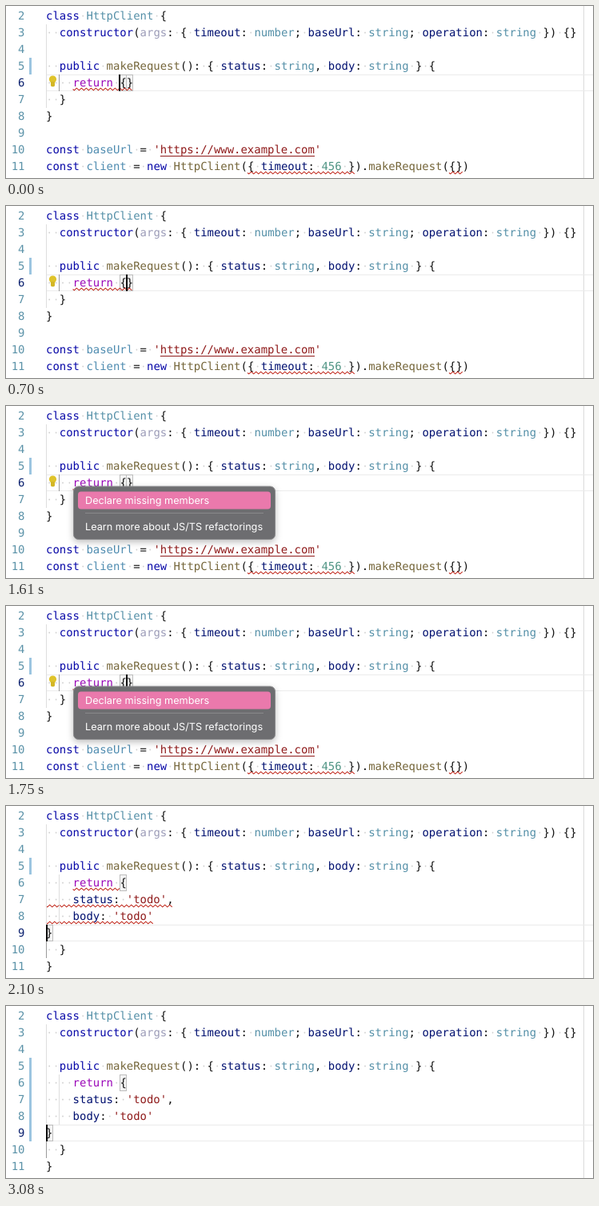
An HTML page that plays this animation: 734x216 px, repeating every 3.15 s.

```html
<!DOCTYPE html>
<html lang="en">
<head>
<meta charset="utf-8">
<title>Declare missing members</title>
<style>
html, body { margin: 0; width: 100%; height: 100%; overflow: hidden; background: #fff; }
svg { display: block; width: 734px; height: 216px; }
.code text {
  font: 13.953px "DejaVu Sans Mono", "Noto Sans Mono", monospace;
  font-variant-ligatures: none;
  text-rendering: geometricPrecision;
}
.plain { fill: #111; }
.key { fill: #0808a8; }
.type { fill: #5590a8; }
.const { fill: #4f8cb0; }
.name { fill: #001070; }
.func { fill: #75663a; }
.flow { fill: #9a08b8; }
.str { fill: #8f1a1a; }
.unused { fill: #9c9cb8; }
.digit { fill: #4f9484; }
.line { fill: #5b92a8; }
.active { fill: #0b216f; }
.dot { fill: #cfcfcf; }
.guide { fill: #dedede; }
.guide.on { fill: #9a9a9a; }
.row { fill: #ebebeb; }
.box { fill: #f4f4f4; stroke: #bdbdbd; }
.wave { fill: none; stroke: #c0281c; stroke-width: 1.05; }
.bar { fill: #9cc5e0; }
.menu text { font: 12.7px Inter, "Liberation Sans", sans-serif; fill: #fff; text-rendering: geometricPrecision; }

#before, #after, #errors, #added, #menu, #caret { animation: 3150ms step-end infinite; }
#before { animation-name: before; }
#after { animation-name: after; }
#errors { animation-name: errors; }
#added { animation-name: added; }
#menu { animation-name: menu; }
#caret { animation-name: caret; }

@keyframes before { 0% { opacity: 1 } 66.6%, 100% { opacity: 0 } }
@keyframes after { 0% { opacity: 0 } 66.6%, 100% { opacity: 1 } }
@keyframes errors { 0% { opacity: 1 } 79.95%, 100% { opacity: 0 } }
@keyframes added { 0% { opacity: 0 } 73.3%, 100% { opacity: 1 } }
@keyframes menu {
  0% { opacity: 0 }
  37.75% { opacity: 1 }
  57.75% { opacity: .7 }
  59.95% { opacity: .37 }
  62.2% { opacity: .07 }
  64.4%, 100% { opacity: 0 }
}
@keyframes caret {
  0% { transform: translate(141px, 86px); opacity: 1 }
  22.2% { transform: translate(150px, 86px); opacity: 1 }
  37.75% { transform: translate(150px, 86px); opacity: 0 }
  55.5% { transform: translate(150px, 86px); opacity: 1 }
  66.6% { transform: translate(50px, 149px); opacity: 1 }
  82.2% { transform: translate(50px, 149px); opacity: 0 }
  97.75%, 100% { transform: translate(50px, 149px); opacity: 1 }
}
</style>
</head>
<body>
<svg viewBox="0 0 734 216" class="code">
  <defs>
    <filter id="shadow" x="-10%" y="-30%" width="120%" height="170%">
      <feDropShadow dx="0" dy="3" stdDeviation="4" flood-color="#000" flood-opacity=".28"/>
    </filter>
  </defs>
  <rect x="722" width="1" height="216" fill="#dcdcdc"/>
  <g id="common"></g>
  <g id="before"></g>
  <g id="after"><g id="errors"></g><g id="added"></g></g>
  <rect id="caret" width="2" height="21"/>
  <g id="menu" class="menu">
    <rect x="84.5" y="101" width="252" height="66.5" rx="6" fill="#6d6d6f" filter="url(#shadow)"/>
    <rect x="84.5" y="101" width="252" height="66.5" rx="6" fill="none" stroke="#8c8c8e"/>
    <rect x="90" y="107.5" width="241" height="22" rx="4" fill="#ea79ac"/>
    <rect x="99" y="134" width="223" height="1" fill="#89898b"/>
    <text x="99" y="123">Declare missing members</text>
    <text x="99" y="156">Learn more about JS/TS refactorings</text>
  </g>
</svg>
<script>
const LEFT = 50, CW = 8.4, LH = 21;
const col = c => LEFT + c * CW;
const rowY = n => 2 + (n - 2) * LH;
const layer = id => document.getElementById(id);

function add(parent, tag, attrs, text) {
  const el = document.createElementNS('http://www.w3.org/2000/svg', tag);
  for (const k in attrs) el.setAttribute(k, attrs[k]);
  if (text) el.textContent = text;
  parent.append(el);
}

const rect = (g, cls, x, y, width, height) => add(g, 'rect', { class: cls, x, y, width, height });
const write = (g, cls, x, n, s) => add(g, 'text', { class: cls, x, y: rowY(n) + 15 }, s);

// Tested against the line up to the end of the token
const rules = [
  [/'$/, 'str'],
  [/\b(class|constructor|public|const|new)$/, 'key'],
  [/\breturn$/, 'flow'],
  [/^const \w+$/, 'const'],
  [/new \w+$|makeRequest$/, 'func'],
  [/\b(HttpClient|string|number)$/, 'type'],
  [/\d$/, 'digit'],
  [/\bargs$/, 'unused'],
  [/\w$/, 'name'],
  [/$/, 'plain']
];

function code(g, n, src) {
  for (const m of src.matchAll(/'[^']*'|\w+|[^\w\s']+| /g)) {
    const s = m[0], x = col(m.index);
    if (s === ' ') {
      add(g, 'circle', { class: 'dot', cx: x + CW / 2, cy: rowY(n) + 10.5, r: .9 });
      continue;
    }
    const head = src.slice(0, m.index) + s;
    write(g, rules.find(r => r[0].test(head))[1], x, n, s);
  }
}

function lineNumber(g, n, active) {
  write(g, active ? 'active' : 'line', 23.5 - CW * String(n).length, n, String(n));
}

function guide(g, c, from, to, on) {
  rect(g, on ? 'guide on' : 'guide', Math.floor(col(c)), rowY(from), 1, (to - from + 1) * LH);
}

function currentRow(g, n) {
  rect(g, 'row', LEFT, rowY(n), 684, 1);
  rect(g, 'row', LEFT, rowY(n) + 20, 684, 1);
}

function bracket(g, n, c) {
  rect(g, 'box', Math.floor(col(c)) + .5, rowY(n) + .5, 8, 20);
}

function wave(g, n, from, to) {
  const y = rowY(n) + 17.2, end = col(to);
  let d = `M${col(from)} ${y + 1.3}`, low = true;
  for (let x = col(from) + 1.75; x <= end; x += 3, low = !low) d += `L${x} ${y + (low ? 2.7 : 0)}`;
  add(g, 'path', { class: 'wave', d });
}

const common = layer('common'), before = layer('before'), after = layer('after');
const errors = layer('errors'), added = layer('added');

// Unchanged lines
guide(common, 0, 3, 5);
['class HttpClient {',
 '  constructor(args: { timeout: number; baseUrl: string; operation: string }) {}',
 '',
 '  public makeRequest(): { status: string, body: string } {'
].forEach((s, i) => code(common, i + 2, s));
for (const n of [2, 3, 4, 5, 7, 8, 10, 11]) lineNumber(common, n);
rect(common, 'bar', 29, rowY(5), 3, LH);

// Empty return value
currentRow(before, 6);
guide(before, 0, 6, 7);
guide(before, 2, 6, 6, true);
bracket(before, 6, 11);
bracket(before, 6, 12);
['    return {}',
 '  }',
 '}',
 '',
 "const baseUrl = 'https://www.example.com'",
 'const client = new HttpClient({ timeout: 456 }).makeRequest({})'
].forEach((s, i) => code(before, i + 6, s));
lineNumber(before, 6, true);
lineNumber(before, 9);
rect(before, 'str', col(17), rowY(10) + 18, 23 * CW, 1);
wave(before, 6, 4, 13);
wave(before, 11, 30, 46);
wave(before, 11, 60, 62);
add(before, 'circle', { cx: 58.5, cy: 92, r: 4.6, fill: '#dfc32a' });
add(before, 'path', { d: 'M56 95h5v5l-1 1.2h-3l-1-1.2z', fill: '#d3b625' });

// Members filled in
currentRow(after, 9);
guide(after, 0, 6, 8);
guide(after, 2, 6, 8);
guide(after, 0, 10, 10, true);
bracket(after, 6, 11);
bracket(after, 9, 0);
['    return {',
 "    status: 'todo',",
 "    body: 'todo'",
 '}',
 '  }',
 '}'
].forEach((s, i) => code(after, i + 6, s));
lineNumber(after, 6);
lineNumber(after, 9, true);
wave(errors, 6, 4, 12);
wave(errors, 7, 0, 19);
wave(errors, 8, 0, 16);
wave(errors, 9, 0, 1);
rect(added, 'bar', 29, rowY(6), 3, 4 * LH);
</script>
</body>
</html>
```
